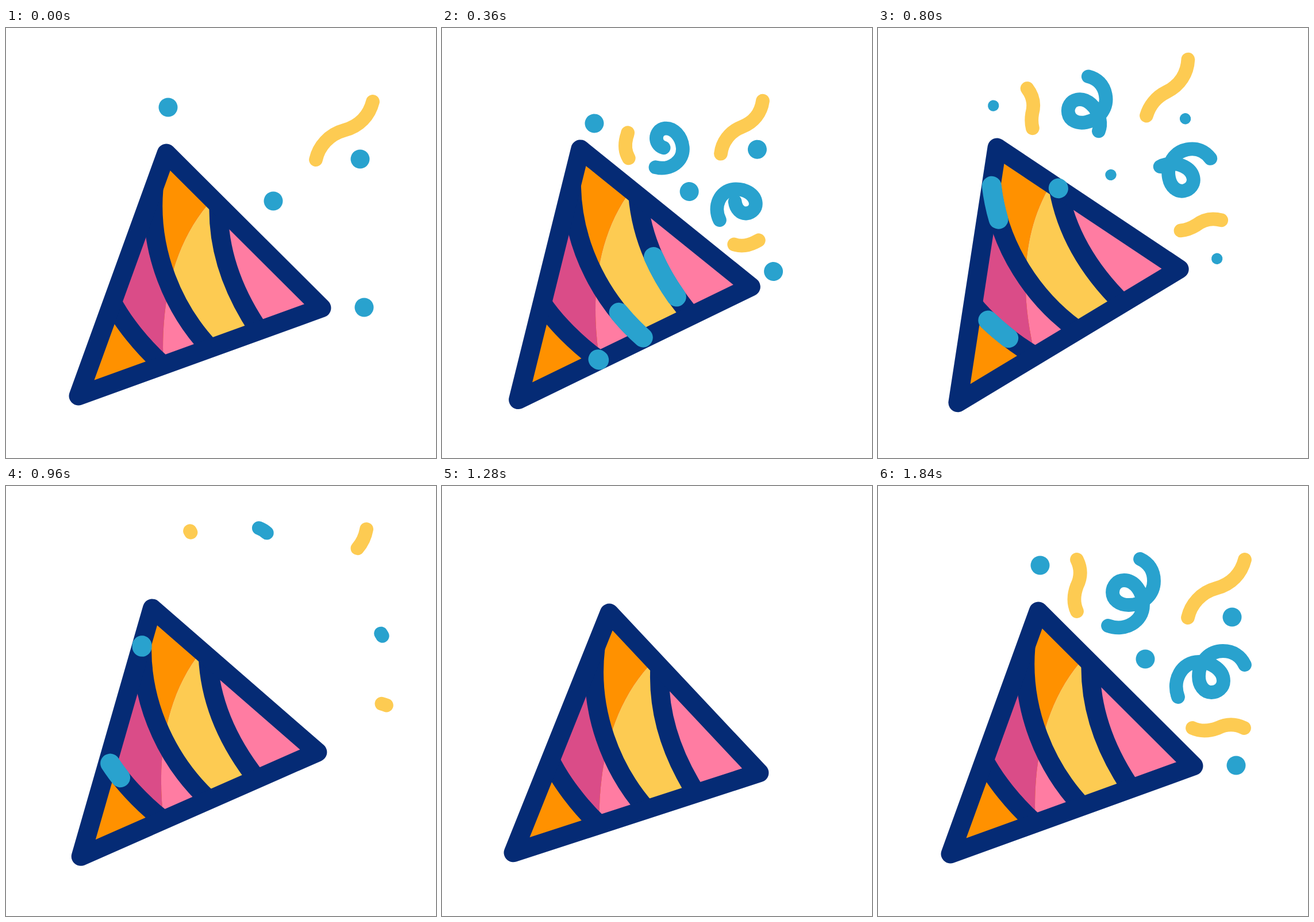
Write an HTML page that moves like this. It is 748x748 px and loops after 2040 ms.

```html
<!DOCTYPE html>
<html lang="en">
<head>
<meta charset="utf-8">
<title>Party popper</title>
<style>
  html, body { margin: 0; width: 100%; height: 100%; overflow: hidden; background: #fff; }
  svg { display: block; width: 100vw; height: 100vh; }
  path { stroke-linecap: round; stroke-linejoin: round; }
  #confetti path { fill: none; }
  .blue { stroke: #29a2ce; }
  .gold { stroke: #fdcb52; }
  .dot { fill: #29a2ce; }
  .light { --a: #fdcb52; --b: #ff7ca2; }
  .shade { --a: #ff9100; --b: #da4c88; }
  .a { fill: var(--a); }
  .b { fill: var(--b); }
  .line { fill: none; stroke: #052b75; stroke-width: 33; }
  .glow { fill: none; stroke: #29a2ce; stroke-width: 34; }
</style>
</head>
<body>
<svg viewBox="0 0 748 748">
  <defs>
    <path id="cone" d="M279 218L549 487L126 640Z"/>
    <g id="bands">
      <use href="#cone" class="b"/>
      <path class="a" d="M441 527C400 467 368 394 370 308L279 218L126 640Z"/>
      <path class="b" d="M355 557C292 490 248 390 257 281L126 640Z"/>
      <path class="a" d="M273 586C238 555 203 512 184 475L126 640Z"/>
    </g>
    <clipPath id="inside"><use href="#cone"/></clipPath>
    <clipPath id="shadow">
      <path d="M360 297C290 372 268 480 274 590L100 660L250 200Z"/>
    </clipPath>
  </defs>
  <g id="popper">
    <g id="confetti"></g>
    <use href="#bands" class="light"/>
    <use href="#bands" class="shade" clip-path="url(#shadow)"/>
    <g id="stripes" clip-path="url(#inside)"></g>
    <use href="#cone" class="line"/>
    <g id="glows"></g>
  </g>
</svg>
<script>
const LOOP = 2040, STEP = 40;
const PIVOT = [192, 580], MOUTH = [434, 360];
const MIRROR = 'matrix(0 -1 -1 0 765 767)';
const CURL = 'M400 243C430 254 461 236 461 207C461 184 446 164 428 164' +
  'C416 164 408 174 408 185C408 198 420 207 436 207C462 207 480 188 480 165C480 147 471 134 456 127';
const WAVE = 'M346 218C340 205 340 190 346 174C353 160 354 144 346 128';
const RIBBON = 'M539 229C544 206 562 185 588 178C615 171 632 152 638 128';

// draw, exit and enter are [start, end] times in ms; dir points away from the cone
const pieces = [
  { d: WAVE, cls: 'gold', dir: [.19, -.98], draw: [0, 645], exit: [720, 990], enter: [1360, 1760], rise: 31 },
  { d: WAVE, cls: 'gold', dir: [.98, -.19], draw: [0, 655], exit: [720, 1020], enter: [1400, 1800], rise: 31, flip: true },
  { d: CURL, cls: 'blue', dir: [.44, -.9], draw: [0, 635], exit: [720, 1000], enter: [1340, 1770], rise: 34 },
  { d: CURL, cls: 'blue', dir: [.9, -.44], draw: [0, 605], exit: [720, 980], enter: [1320, 1725], rise: 34, flip: true },
  { d: RIBBON, cls: 'gold', dir: [.707, -.707], draw: [-2, -1], exit: [720, 1080], enter: [1400, 1840], rise: 50 }
];
const dots = [[282, 138], [465, 301], [616, 228], [623, 486]].map(([x, y]) => ({ x, y }));
const stripes = [
  { d: 'M441 527C400 467 368 394 370 308', head: [40, 660], tail: [180, 820] },
  { d: 'M355 557C292 490 248 390 257 281', head: [160, 820], tail: [320, 1000] },
  { d: 'M273 586C238 555 203 512 184 475', head: [300, 1080], tail: [500, 1205] }
];

const byId = id => document.getElementById(id);

function add(parent, tag, attrs) {
  const el = document.createElementNS('http://www.w3.org/2000/svg', tag);
  for (const k in attrs) el.setAttribute(k, attrs[k]);
  return parent.appendChild(el);
}

function ease(t, [from, to]) {
  const p = Math.min(1, Math.max(0, (t - from) / (to - from)));
  return .5 - .5 * Math.cos(Math.PI * p);
}

// Show only the part of a path between two fractions of its length.
function trim(el, tail, head) {
  const len = head - tail;
  el.setAttribute('visibility', len > .0005 ? 'visible' : 'hidden');
  el.setAttribute('stroke-dasharray', `${Math.max(len, .0005)} 3`);
  el.setAttribute('stroke-dashoffset', -tail);
}

for (const p of pieces) {
  p.g = add(byId('confetti'), 'g', {});
  p.el = add(p.g, 'path', { d: p.d, class: p.cls, pathLength: 1 });
  if (p.flip) p.el.setAttribute('transform', MIRROR);
}
for (const c of dots) c.el = add(byId('confetti'), 'circle', { class: 'dot' });
for (const s of stripes) {
  add(byId('stripes'), 'path', { d: s.d, class: 'line' });
  s.el = add(byId('glows'), 'path', { d: s.d, class: 'glow', pathLength: 1 });
}

function render(t) {
  const angle = -12 * ease(t, [0, 720]) + 18 * ease(t, [735, 1215]) - 6 * ease(t, [1215, 1320]);
  byId('popper').setAttribute('transform', `rotate(${angle} ${PIVOT})`);

  const scale = 1 - .26 * ease(t, [0, 600]) + .26 * ease(t, [600, 860]);
  const entering = t >= 1200;
  const [mx, my] = MOUTH;

  for (const p of pieces) {
    const head = ease(t, entering ? p.enter : p.draw);
    const tail = entering ? 0 : ease(t, p.exit);
    const shift = entering ? -p.rise * (1 - head) : 42 * tail;
    const x = mx * (1 - scale) + p.dir[0] * shift;
    const y = my * (1 - scale) + p.dir[1] * shift;
    p.g.setAttribute('transform', `translate(${x} ${y}) scale(${scale})`);
    p.el.setAttribute('stroke-width', 23.8 / scale);
    trim(p.el, tail, head);
  }

  const size = entering ? ease(t, [1520, 1760]) : 1 - ease(t, [720, 900]);
  for (const c of dots) {
    c.el.setAttribute('cx', mx + (c.x - mx) * scale);
    c.el.setAttribute('cy', my + (c.y - my) * scale);
    c.el.setAttribute('r', 16.5 * size);
  }

  for (const s of stripes) trim(s.el, ease(t, s.tail), ease(t, s.head));
}

function tick() {
  const t = performance.now() % LOOP;
  render(Math.floor(t / STEP) * STEP);
  requestAnimationFrame(tick);
}
tick();
</script>
</body>
</html>
```
